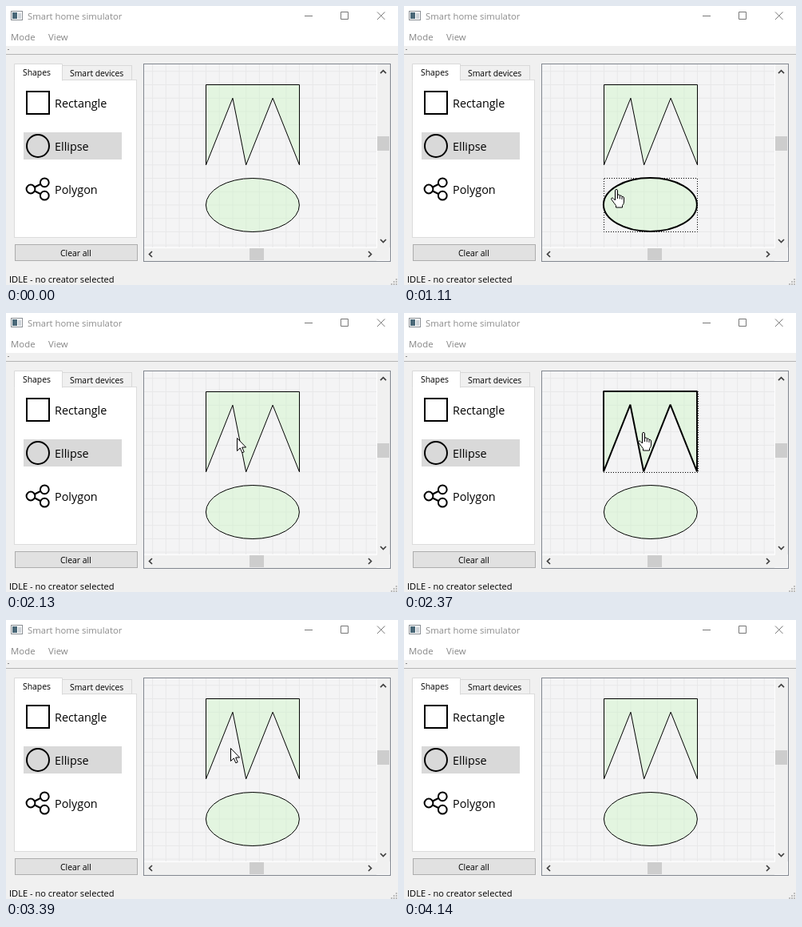
An HTML page that plays this animation: 491x349 px, repeating every 4.28 s.

```html
<!DOCTYPE html>
<html lang="en">
<head>
<meta charset="utf-8">
<title>Smart home simulator</title>
<style>
  html, body { margin: 0; width: 100%; height: 100%; overflow: hidden; background: #f0f0f0; }
  svg { display: block; width: 491px; height: 349px; }
  text { font-family: "Open Sans", "Noto Sans", sans-serif; font-size: 11.3px; fill: #000; white-space: pre; }
  .title { fill: #8c8c8c; }
  .menu { fill: #868686; font-size: 11.4px; }
  .status { font-size: 11.1px; }
  .small { font-size: 10.4px; }
  .tool { font-size: 14.4px; }
  .line { fill: none; stroke-width: 1; }
  .icon { fill: none; stroke: #000; stroke-width: 2; }
  .shape { fill: rgba(199, 244, 193, .4); stroke: #000; stroke-width: 1; stroke-linejoin: bevel; }
  .box { fill: none; stroke: #000; stroke-dasharray: 1 2; stroke-dashoffset: -.5; visibility: hidden; }
  .hover .shape { stroke-width: 2; transform: translate(-.5px, -.5px); }
  .hover .box { visibility: visible; }
  .cursor { fill: #fff; stroke: #000; stroke-width: 1; stroke-linejoin: round; }
</style>
</head>
<body>
<svg viewBox="0 0 491 349">
  <!-- window frame -->
  <rect width="491" height="349" fill="#f0f0f0"/>
  <rect width="491" height="50" fill="#fff"/>
  <path class="line" stroke="#b4b4b4" d="M0 60.5H491"/>
  <rect x="2" y="54" width="2" height="1" fill="#888"/>
  <rect x="6.5" y="6.5" width="14" height="11" fill="#fff" stroke="#8a8f94"/>
  <rect x="8" y="8" width="6" height="8" fill="#4a6878"/>
  <rect x="15" y="9" width="4" height="7" fill="#cdd3d8"/>
  <text class="title" x="27" y="17">Smart home simulator</text>
  <path class="line" stroke="#777" d="M374 12.5H384M419.5 7.5H428.5V16.5H419.5ZM465 7.5L474.5 17M474.5 7.5L465 17"/>
  <text class="menu" x="6" y="43">Mode</text>
  <text class="menu" x="53" y="43">View</text>

  <!-- tool panel -->
  <rect x="10.5" y="92.5" width="153" height="197" fill="#fff" stroke="#dcdcdc"/>
  <rect x="70.5" y="74.5" width="87" height="18" fill="#f0f0f0" stroke="#d9d9d9"/>
  <path d="M10.5 93.5V72.5H70.5V93.5" fill="#fff" stroke="#d9d9d9"/>
  <rect x="11" y="92" width="59" height="3" fill="#fff"/>
  <text class="small" x="21" y="87">Shapes</text>
  <text class="small" x="80" y="88">Smart devices</text>
  <rect x="22" y="158" width="123" height="34" fill="#d9d9d9"/>
  <rect class="icon" x="26" y="107" width="28" height="28"/>
  <circle class="icon" cx="40" cy="175" r="14"/>
  <path class="icon" d="M36 226.5L43 223M36 231.5L43 235"/>
  <circle class="icon" cx="31" cy="229" r="5.4"/>
  <circle class="icon" cx="48.3" cy="220.8" r="5.4"/>
  <circle class="icon" cx="48.3" cy="237.2" r="5.4"/>
  <text class="tool" x="61" y="127">Rectangle</text>
  <text class="tool" x="61" y="181">Ellipse</text>
  <text class="tool" x="61" y="235">Polygon</text>
  <rect x="11.5" y="298.5" width="153" height="20" fill="#e1e1e1" stroke="#adadad"/>
  <text class="small" x="68" y="313">Clear all</text>
  <text class="status" x="4" y="346">IDLE - no creator selected</text>
  <g id="grip" fill="#bdbdbd"></g>

  <!-- canvas with scroll bars -->
  <rect x="172.5" y="72.5" width="309" height="247" fill="#f0f0f0" stroke="#828790"/>
  <rect x="173" y="73" width="291" height="229" fill="#f4f4f5"/>
  <path id="grid" class="line" stroke="#e8e8e9"/>
  <path class="line" stroke="#fff" d="M464.5 73V302.5H173M464 318.5H480.5V302"/>
  <rect x="465" y="163" width="15" height="18" fill="#cdcdcd"/>
  <rect x="305" y="303" width="18" height="15" fill="#cdcdcd"/>
  <path class="line" stroke="#404040" style="stroke-width:1.7"
    d="M469 84.2L472.5 80.7L476 84.2M469 292L472.5 295.5L476 292M183 307L179.5 310.5L183 314M454 307L457.5 310.5L454 314"/>

  <g id="polygon">
    <path class="shape"/>
    <rect class="box" x="250.5" y="98.5" width="118" height="101"/>
  </g>
  <g id="ellipse">
    <ellipse class="shape" cx="308.9" cy="249" rx="58.5" ry="33.5"/>
    <rect class="box" x="250.5" y="215.5" width="117" height="67"/>
  </g>

  <g id="pointer" class="cursor">
    <path id="arrow" d="M.5 .5V16.5L4.3 12.9L6.8 18.8L9.2 17.8L6.7 12H11.6Z"/>
    <g id="hand" transform="translate(-6)">
      <path d="M5.5 1.8Q5.5 .5 7 .5T8.5 1.8V8Q8.6 6.8 9.8 6.9T11.3 8.2V9Q11.4 7.9 12.5 8T14 9.3V10.2Q14.2 9.2 15.2 9.4T16.5 11V16Q16.5 18.5 14.5 20.5V23H6.5V20.5Q4.5 18 1 13.2Q.2 11.9 1.2 11.2T3.3 11.8L5.5 14Z"/>
      <path fill="none" d="M8.5 8V12M11.3 9V12.4M14 10.2V13"/>
    </g>
  </g>
</svg>
<script>
const LOOP = 4280, STEP = 47, HIDE = 4140;
const CELL = 16.72, LEFT = 250.5, TOP = 98.5;

const $ = id => document.getElementById(id);
const svg = document.querySelector("svg");
const shapes = [$("polygon"), $("ellipse")];

// Each stroke of the pointer slows down to a rest, which lasts until the next one
const moves = [
  move(230, 740, "M316 338C250 290 215 250 246 215"),
  move(780, 1110, "M250 222C300 255 300 240 265 229"),
  move(1350, 1520, "M265 227L261 217"),
  move(1670, 2170, "M262 216Q276 195 289 155"),
  move(2220, 2550, "M292 152Q299 149 303 147"),
  move(2830, 2970, "M300 146L264 141"),
  move(3070, 3290, "M263 142Q266 160 279 161"),
  move(3390, 3900, "M281 160C262 222 160 215 266 284"),
  move(3940, HIDE, "M305 296L435 342")
];

function move(start, end, d) {
  const curve = document.createElementNS(svg.namespaceURI, "path");
  curve.setAttribute("d", d);
  return { start, end, curve, length: curve.getTotalLength() };
}

function position(t) {
  const { start, end, curve, length } = moves.findLast(m => t >= m.start);
  const steps = Math.round((end - start) / STEP);
  const p = Math.min(1, Math.floor((t - start) / (end - start) * steps) / steps);
  const { x, y } = curve.getPointAtLength(length * Math.sin(p * Math.PI / 2));
  return [Math.round(x), Math.round(y)];
}

function drawCanvas() {
  const x = k => LEFT + k * CELL, y = k => TOP + k * CELL;
  let lines = "";
  for (let k = -4; k <= 12; k++) lines += `M${x(k)} 73V302`;
  for (let k = -1; k <= 12; k++) lines += `M173 ${y(k)}H464`;
  $("grid").setAttribute("d", lines);
  $("polygon").firstElementChild.setAttribute("d",
    `M${x(0)} ${y(0)}H${x(7)}V${y(6)}L${x(5)} ${y(1)}L${x(3)} ${y(6)}L${x(2)} ${y(1)}L${x(0)} ${y(6)}Z`);
}

function drawGrip() {
  let dots = "";
  for (let row = 0; row < 3; row++)
    for (let col = 2 - row; col < 3; col++)
      dots += `<rect x="${482 + col * 3}" y="${341 + row * 3}" width="2" height="2"/>`;
  $("grip").innerHTML = dots;
}

function render(t) {
  const visible = t >= moves[0].start && t < HIDE;
  const [x, y] = visible ? position(t) : [-50, -50];
  const point = svg.createSVGPoint();
  point.x = x;
  point.y = y;
  let over = false;
  for (const shape of shapes) {
    const hit = shape.firstElementChild.isPointInFill(point);
    shape.classList.toggle("hover", hit);
    over = over || hit;
  }
  $("pointer").setAttribute("transform", `translate(${x} ${y})`);
  $("arrow").style.display = over ? "none" : "";
  $("hand").style.display = over ? "" : "none";
}

function tick() {
  render(performance.now() % LOOP);
  requestAnimationFrame(tick);
}

drawCanvas();
drawGrip();
tick();
</script>
</body>
</html>
```
